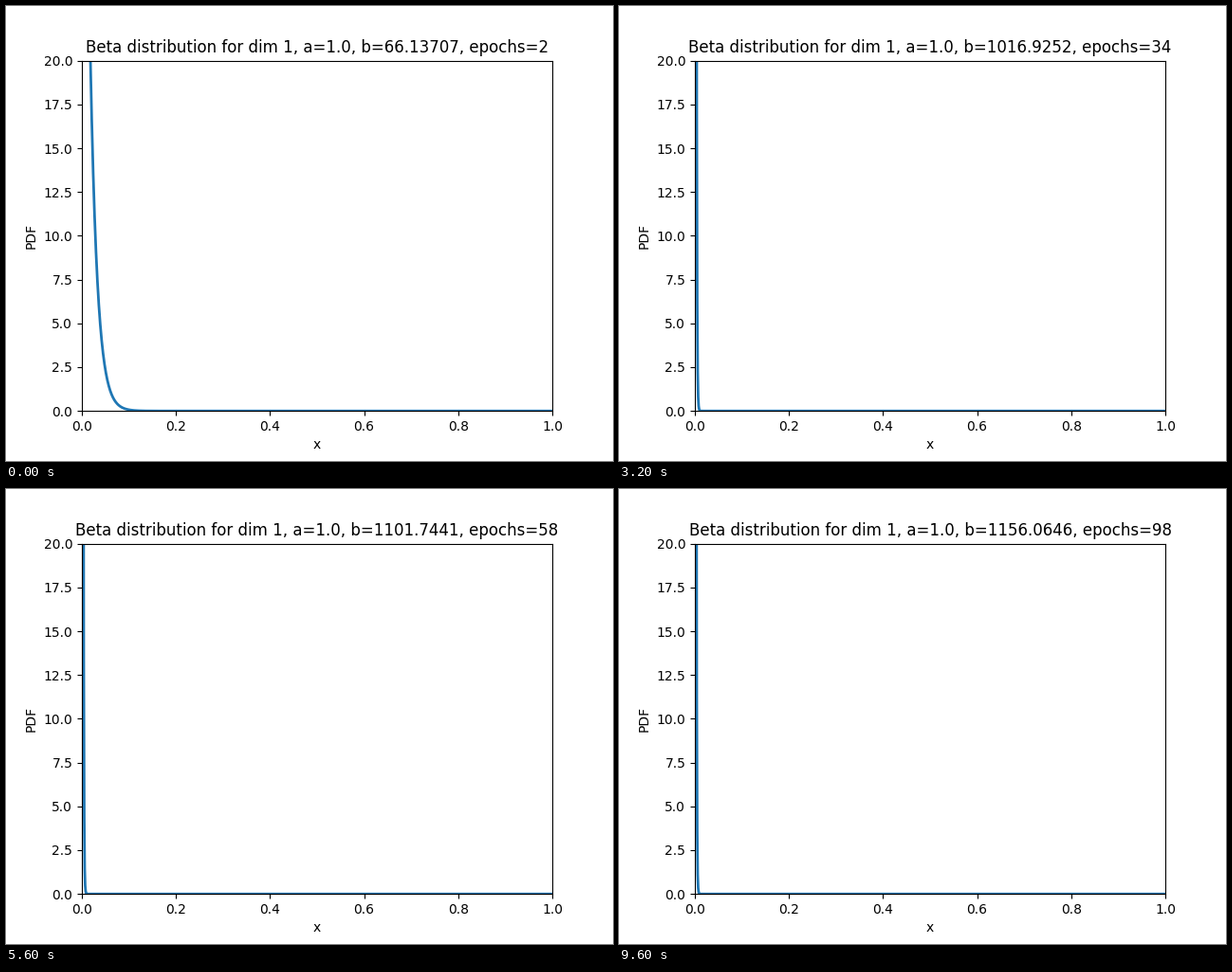
A matplotlib script for the animation above (9800 ms loop, 640x480 px).

```python
import matplotlib.pyplot as plt
import numpy as np
from matplotlib.animation import FuncAnimation

FRAMES = 49
INTERVAL = 200

# Fitted values of b at a few epochs; those between are interpolated
KNOT_EPOCHS = [2, 16, 34, 50, 58, 74, 98]
KNOT_B = [66.13707, 391.03632, 1016.9252, 1015.2907,
          1101.7441, 1129.8401, 1156.0646]

x = np.linspace(0, 1, 1000)


def beta_pdf(b):
    """Beta density for a = 1."""
    return b * (1 - x) ** (b - 1)


def draw(frame):
    epoch = 2 * (frame + 1)
    b = np.interp(epoch, KNOT_EPOCHS, KNOT_B)
    decimals = 5 if b < 1000 else 4
    line.set_data(x, beta_pdf(b))
    title.set_text(f"Beta distribution for dim 1, a=1.0, "
                   f"b={b:.{decimals}f}, epochs={epoch}")
    return line, title


fig, ax = plt.subplots(figsize=(6.4, 4.8), dpi=100)
line, = ax.plot([], [], lw=2)
title = ax.set_title("")
ax.set(xlim=(0, 1), ylim=(0, 20), xlabel="x", ylabel="PDF")

anim = FuncAnimation(fig, draw, frames=FRAMES, interval=INTERVAL,
                     init_func=lambda: draw(0), repeat=True, repeat_delay=0)
plt.show()
```
